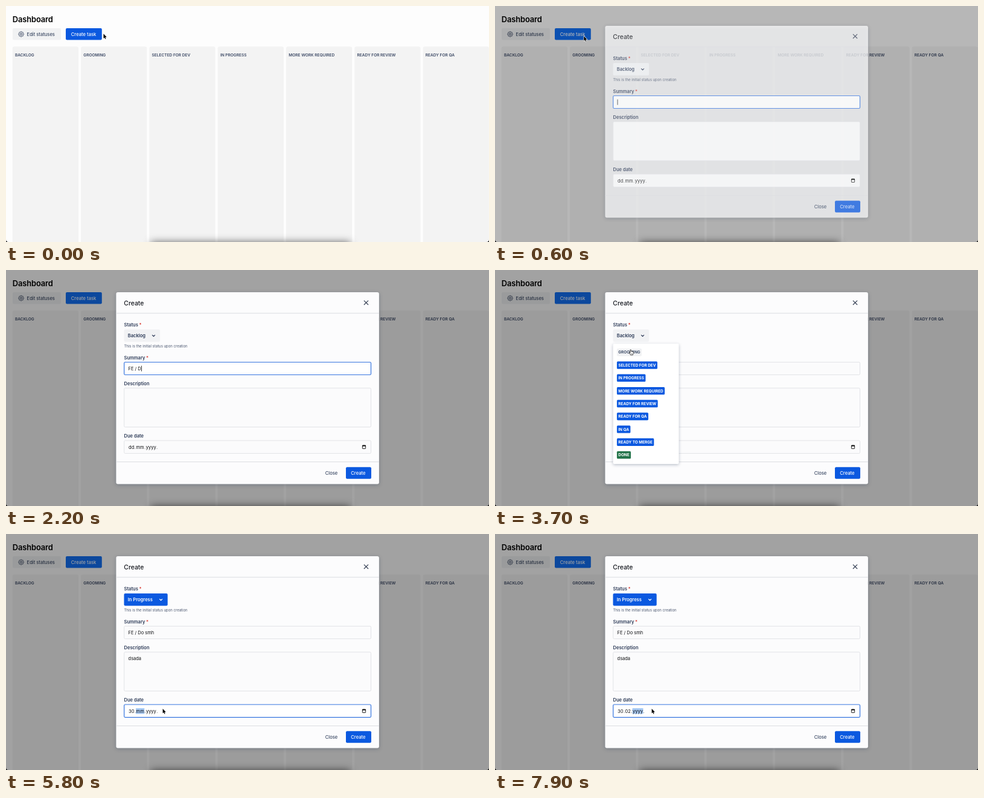
An HTML page with a canvas for the animation above (8 s loop, 800x393 px).

```html
<!DOCTYPE html>
<html lang="en">
<head>
<meta charset="utf-8">
<title>Dashboard</title>
<style>
html, body { margin: 0; width: 100%; height: 100%; overflow: hidden; background: #fdfdfd; }
canvas { display: block; width: 100vw; height: 100vh; }
</style>
</head>
<body>
<canvas id="stage"></canvas>
<script>
const W = 800, H = 393, LOOP = 8000, STEP = 100;
const canvas = document.getElementById('stage');
const ctx = canvas.getContext('2d');

const BLUE = '#0b59e0', NAVY = '#2c3a57', INK = '#0c0d10', LINE = '#e2e3e7';
const STATUSES = ['GROOMING', 'SELECTED FOR DEV', 'IN PROGRESS', 'MORE WORK REQUIRED',
  'READY FOR REVIEW', 'READY FOR QA', 'IN QA', 'READY TO MERGE', 'DONE'];
const COLUMNS = ['BACKLOG', ...STATUSES.slice(0, 6)];

// Key points: time followed by values
const BLANKET = [[400, 0], [500, .115], [600, .28], [700, .355], [800, .36]];
const MODAL = [[400, 0, -20], [500, .16, -12], [600, .75, -4], [700, .97, -.4], [800, 1, 0]];
const MOUSE = [[0, 161.5, 46.3], [300, 147.3, 50.3], [3100, 147.3, 50.3], [3400, 238, 112],
  [3500, 236, 114], [3700, 224.6, 132.5], [3900, 225, 138], [4200, 228, 178], [4300, 228, 179],
  [4900, 259.6, 291]];
const TIMES = {
  typeSummary: 1300, typeText: 2800, open: 3500, pick: 4300, date: 5000,
  day1: 5300, day2: 5600, month: 6900
};

function at(keys, t) {
  let i = 0;
  while (i < keys.length - 1 && keys[i + 1][0] <= t) i++;
  const a = keys[i], b = keys[i + 1];
  if (!b || t <= a[0]) return a.slice(1);
  const k = (t - a[0]) / (b[0] - a[0]);
  return a.slice(1).map((v, j) => v + (b[j + 1] - v) * k);
}

function setFont(size, weight) {
  ctx.font = `${weight} ${size}px Inter, "Open Sans", sans-serif`;
}

// y is the middle of the capitals; returns the right edge
function text(s, x, y, size, weight, color) {
  setFont(size, weight);
  ctx.fillStyle = color;
  ctx.fillText(s, x, y + size * .364);
  return x + ctx.measureText(s).width;
}

function box(x, y, w, h, r, fill, stroke, lw = 1) {
  ctx.beginPath();
  ctx.roundRect(x, y, w, h, r);
  if (fill) { ctx.fillStyle = fill; ctx.fill(); }
  if (stroke) { ctx.strokeStyle = stroke; ctx.lineWidth = lw; ctx.stroke(); }
}

function shadowed(color, blur, dy, draw) {
  ctx.save();
  ctx.shadowColor = color;
  ctx.shadowBlur = blur * canvas.width / W;
  ctx.shadowOffsetY = dy * canvas.width / W;
  draw();
  ctx.restore();
}

function lines(color, lw, ...paths) {
  ctx.strokeStyle = color;
  ctx.lineWidth = lw;
  ctx.beginPath();
  for (const p of paths)
    p.forEach(([x, y], i) => i ? ctx.lineTo(x, y) : ctx.moveTo(x, y));
  ctx.stroke();
}

function gear(x, y) {
  ctx.beginPath();
  for (let i = 0; i <= 96; i++) {
    const a = i / 96 * Math.PI * 2;
    const r = 3.9 + .5 * Math.tanh(3 * Math.cos(8 * a));
    ctx.lineTo(x + r * Math.cos(a), y + r * Math.sin(a));
  }
  ctx.strokeStyle = NAVY;
  ctx.lineWidth = .9;
  ctx.stroke();
  ctx.beginPath();
  ctx.arc(x, y, 1.6, 0, 7);
  ctx.stroke();
}

function page(t, mouse) {
  ctx.fillStyle = '#fdfdfd';
  ctx.fillRect(0, 0, W, H);
  ctx.letterSpacing = '-0.1px';
  text('Dashboard', 10.7, 22.6, 12.9, 600, '#000');
  ctx.letterSpacing = '0px';
  box(11, 37, 80, 19.6, 2, '#f1f2f3');
  gear(25.1, 46.9);
  text('Edit statuses', 34.6, 46.8, 7.55, 500, '#3a4863');
  const hover = t < 600 && mouse[0] < 159;
  box(99, 37, 59.8, 19.6, 2, hover ? '#0944b0' : t < 600 ? BLUE : '#1270f5');
  text('Create task', 107.8, 46.8, 7.6, 500, '#fff');
  COLUMNS.forEach((name, i) => {
    const x = 10.8 + i * 113.3;
    box(x, 67.6, 109.2, 340, 3, '#f3f3f3');
    text(name, x + 4.2, 81.7, 6.55, 600, '#3d4a66');
  });
}

function label(s, y, required) {
  const x = text(s, 195.5, y, 7.55, 600, NAVY);
  if (required) text('*', x + 1.6, y, 7.55, 600, '#d8342b');
}

function field(y, h, focus) {
  box(195.7, y, 408.8, h, 1.8, focus ? '#fff' : '#fbfbfc', focus ? '#3574df' : LINE, focus ? 1.2 : 1);
}

function caret(x, y) {
  ctx.fillStyle = '#000';
  ctx.fillRect(x, y - 4.6, .8, 9.2);
}

function typed(s, t, start, gap) {
  return s.slice(0, Math.max(0, Math.floor((t - start) / gap) + 1));
}

function entry(s, y, focus, busy, since) {
  const x = text(s, 202.6, y, 7.45, 400, INK);
  if (focus && (busy || since % 1000 < 500)) caret(x + (s ? .3 : 0), y);
}

function dateField(t) {
  const focus = t >= TIMES.date;
  field(284, 21.4, focus);
  const day = t >= TIMES.day2 ? '30' : t >= TIMES.day1 ? '03' : 'dd';
  const month = t >= TIMES.month ? '02' : 'mm';
  const active = !focus ? -1 : t < TIMES.day2 ? 0 : t < TIMES.month ? 1 : 2;
  let x = 202.6;
  [day, month, 'yyyy'].forEach((part, i) => {
    setFont(7.5, 400);
    const w = ctx.measureText(part).width + 1;
    if (i === active) {
      ctx.fillStyle = '#a9cbf5';
      ctx.fillRect(x, 290, w, 9.6);
    }
    text(part, x + .5, 295, 7.5, 400, INK);
    x = text('.', x + w, 295, 7.5, 400, INK);
  });
  box(590.4, 292.2, 5.2, 5.3, .6, null, '#111', .9);
  ctx.fillStyle = '#111';
  ctx.fillRect(590, 292, 6, 1.6);
  ctx.fillRect(591.2, 291, .9, 1.4);
  ctx.fillRect(593.9, 291, .9, 1.4);
}

function statusButton(picked) {
  box(195.5, 98.9, picked ? 72.2 : 59.6, 20.7, 2, picked ? BLUE : '#f1f2f4');
  const color = picked ? '#fff' : NAVY, x = picked ? 256.6 : 244.5;
  text(picked ? 'In Progress' : 'Backlog', 201.7, 109.3, 7.55, 600, color);
  lines(color, 1.2, [[x - 2.4, 108.1], [x, 110.5], [x + 2.4, 108.1]]);
}

function menu(mouse) {
  shadowed('rgba(9,30,66,.28)', 5, 1.5, () => box(195.5, 122.5, 109, 200.4, 2, '#fff'));
  STATUSES.forEach((name, i) => {
    const y = 137 + i * 21.36;
    const hover = Math.abs(mouse[1] + 2 - y) < 10.7;
    setFont(6.4, 700);
    const w = ctx.measureText(name).width + 4.8;
    const fill = i === 0 ? (hover ? '#f1f2f4' : '#e6e8ec') : i === 8 ? '#23744a' : BLUE;
    box(201.9, y - 6.2, w, 12.6, 1.6, fill);
    text(name, 204.3, y + .1, 6.4, 700, i ? '#fff' : '#42506b');
  });
}

function modal(t, mouse) {
  const [alpha, dy] = at(MODAL, t);
  if (!alpha) return;
  const T = TIMES;
  ctx.save();
  ctx.globalAlpha = alpha;
  ctx.translate(0, dy);
  shadowed('rgba(9,30,66,.25)', 6, 1.5, () => box(182.4, 37, 435.5, 319.5, 3, '#fcfcfd'));
  text('Create', 195.3, 55, 10.4, 500, '#15181f');
  lines('#2f3a50', 1.1, [[592.9, 50.8], [600.1, 58]], [[600.1, 50.8], [592.9, 58]]);
  ctx.fillStyle = '#dcdee2';
  ctx.fillRect(182.4, 71.5, 435.5, 1);
  ctx.fillRect(182.4, 319, 435.5, 1);

  label('Status', 91.6, true);
  statusButton(t >= T.pick);
  text('This is the initial status upon creation', 195.5, 126.7, 6, 400, '#4c5870');

  label('Summary', 146.3, true);
  const inSummary = t < T.typeText;
  field(153.5, 21, inSummary);
  entry(typed('FE / Do smh', t, T.typeSummary, 170), 164.1, inSummary, t >= T.typeSummary, t - 500);

  label('Description', 189.3);
  const inText = t >= T.typeText && t < T.open;
  field(196.7, 64.8, inText);
  entry(typed('dsada', t, T.typeText, 90), 207.6, inText, t < 3700, 0);

  label('Due date', 276.7);
  dateField(t);
  text('Close', 528.8, 338.1, 7.55, 500, '#3a4863');
  box(563, 328.2, 42, 19.6, 2, BLUE);
  text('Create', 571.3, 338.1, 7.6, 500, '#fff');
  if (t >= T.open && t < T.pick) menu(mouse);
  ctx.restore();
}

function arrow(x, y) {
  const p = [[0, 0], [0, 7.6], [1.7, 6.1], [2.8, 8.7], [4, 8.2], [2.9, 5.7], [5.2, 5.5]];
  ctx.beginPath();
  p.forEach(([a, b]) => ctx.lineTo(x + a, y + b));
  ctx.closePath();
  ctx.lineJoin = 'round';
  ctx.strokeStyle = '#fff';
  ctx.lineWidth = 1.3;
  ctx.stroke();
  ctx.fillStyle = '#000';
  ctx.fill();
}

function hand(x, y) {
  const p = [[-.7, .6], [0, 0], [.8, .6], [.9, 3.2], [2, 3], [3.2, 3.4], [4.6, 4], [4.8, 5.8],
    [3.9, 7.8], [3.8, 9], [-.3, 9], [-.6, 8], [-2.6, 5.4], [-2, 4.8], [-.7, 5.8]];
  ctx.beginPath();
  p.forEach(([a, b]) => ctx.lineTo(x + a, y + b));
  ctx.closePath();
  ctx.lineJoin = 'round';
  ctx.fillStyle = '#fff';
  ctx.fill();
  ctx.strokeStyle = '#222';
  ctx.lineWidth = .8;
  ctx.stroke();
  lines('#222', .5, [[x + 1.1, y + 6], [x + 1.1, y + 7.8]], [[x + 2.5, y + 6], [x + 2.5, y + 7.8]]);
}

function pointer(t, [x, y]) {
  if (t >= TIMES.typeSummary && t < 3100) return;
  if (t >= 3300 && t < 4400) hand(x, y);
  else arrow(x, y);
}

// Dock shade and the rounded lower corners of the window
function edges() {
  shadowed('rgba(0,0,0,.62)', 13, 0, () => {
    ctx.fillStyle = '#000';
    ctx.fillRect(240, H + .4, 330, 30);
  });
  ctx.beginPath();
  ctx.rect(0, 0, W, H);
  ctx.roundRect(0, -10, W, H + 10, [0, 0, 4, 4]);
  ctx.fillStyle = '#000';
  ctx.fill('evenodd');
}

function draw(now) {
  const t = Math.floor(now % LOOP / STEP) * STEP;
  const dpr = window.devicePixelRatio || 1;
  const w = Math.round(innerWidth * dpr), h = Math.round(innerHeight * dpr);
  if (canvas.width !== w || canvas.height !== h) {
    canvas.width = w;
    canvas.height = h;
  }
  ctx.setTransform(w / W, 0, 0, h / H, 0, 0);
  const mouse = at(MOUSE, t);
  page(t, mouse);
  ctx.fillStyle = `rgba(0,0,0,${at(BLANKET, t)[0]})`;
  ctx.fillRect(0, 0, W, H);
  modal(t, mouse);
  pointer(t, mouse);
  edges();
}

const start = performance.now();
function tick() {
  draw(performance.now() - start);
  requestAnimationFrame(tick);
}
tick();
</script>
</body>
</html>
```
